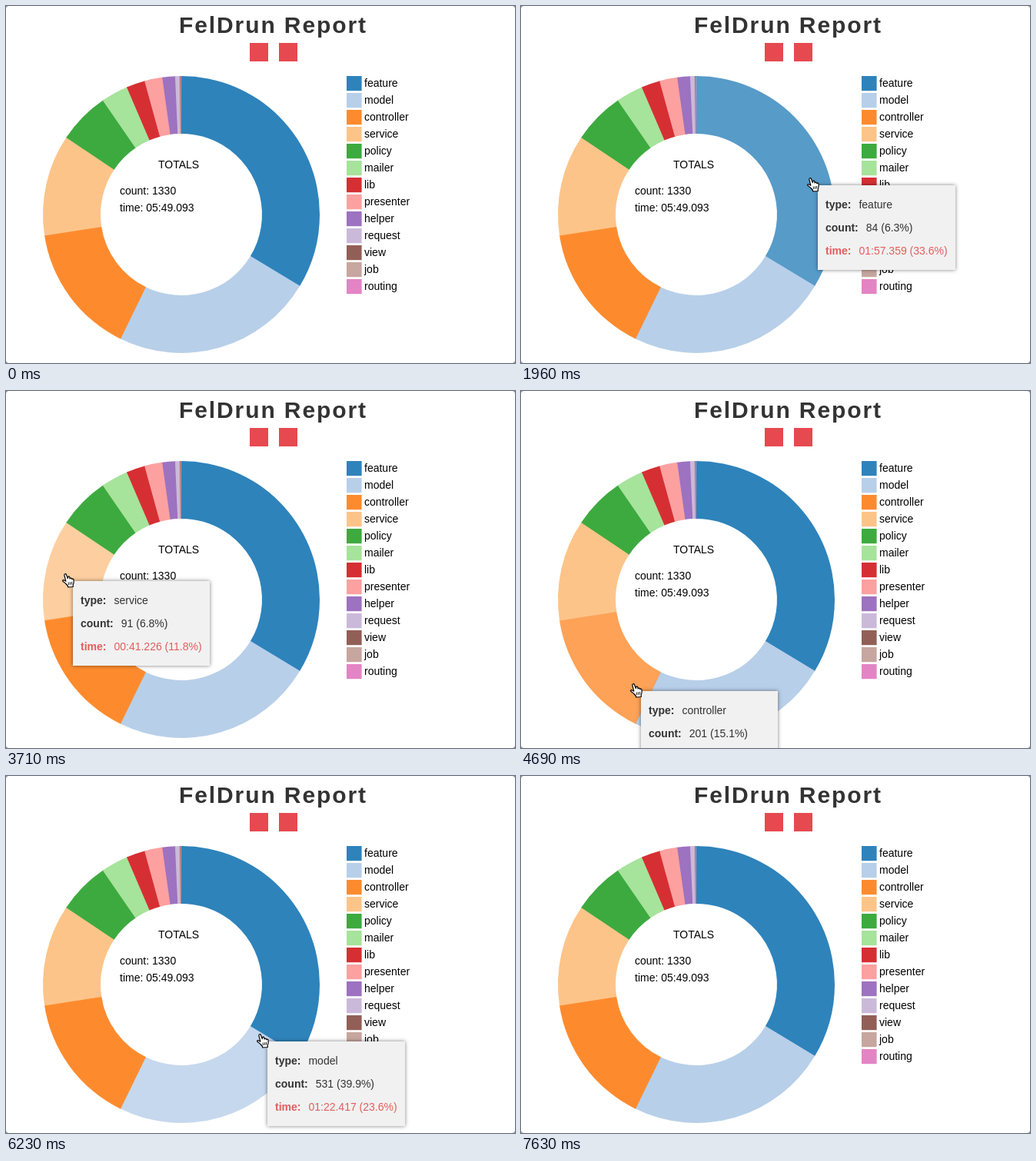
Animation, 662 px wide and 464 px high, one loop 7.7 s. Source, as an HTML page with a canvas:

```html
<!DOCTYPE html>
<html lang="en">
<head>
<meta charset="utf-8">
<title>FelDrun Report</title>
<style>
  html, body { margin: 0; width: 100%; height: 100%; overflow: hidden; background: #fff; }
  canvas { display: block; }
</style>
</head>
<body>
<canvas id="stage" width="662" height="464"></canvas>
<script>
const ctx = document.getElementById('stage').getContext('2d');
const W = 662, H = 464, LOOP = 7700, STEP = 70;
const FACE = '"Liberation Sans", Arial, sans-serif';
const PLAIN = '14px ' + FACE, BOLD = 'bold 14px ' + FACE;
const CX = 228, CY = 271, OUTER = 180, INNER = 105;
const TAU = Math.PI * 2;
const LAP = 0.005; // slices run slightly under the next one, so no seam shows

// name, colour, count, seconds
const TAGS = [
  ['feature', '#2e83bb', 84, 117.359],
  ['model', '#b8cfe9', 531, 82.417],
  ['controller', '#fd8b2e', 201, 53.511],
  ['service', '#fdc489', 91, 41.226],
  ['policy', '#3daa3f', 178, 21.021],
  ['mailer', '#a6e39b', 62, 11.032],
  ['lib', '#d62f33', 97, 7.575],
  ['presenter', '#fda0a0', 34, 7.261],
  ['helper', '#9d72c0', 26, 5.184],
  ['request', '#cbb9da', 8, 1.92],
  ['view', '#925f56', 11, 0.314],
  ['job', '#c7a69f', 5, 0.173],
  ['routing', '#e384c5', 2, 0.1]
].map(([name, color, count, secs]) => ({ name, color, count, secs }));

const sum = key => TAGS.reduce((total, tag) => total + tag[key], 0);
const COUNT = sum('count'), SECS = sum('secs');

let turn = 0;
for (const tag of TAGS) {
  tag.from = turn;
  turn += tag.secs / SECS * TAU;
  tag.to = turn;
}

// pointer path: time, x, y
const PATH = [
  [140, 268, -30], [280, 268, 40], [490, 275, 170], [770, 322, 338],
  [980, 290, 310], [1400, 285, 285], [1680, 305, 270], [1960, 376, 223],
  [2240, 346, 168], [2520, 268, 128], [2800, 218, 144], [3080, 182, 130],
  [3360, 130, 158], [3710, 77, 237], [4130, 88, 308], [4550, 128, 366],
  [5040, 196, 402], [5600, 278, 384], [6160, 325, 340], [6580, 348, 312],
  [6930, 351, 305], [7210, 342, 345], [7560, 318, 480]
];

function slope(i, k) {
  const a = PATH[Math.max(i - 1, 0)], b = PATH[Math.min(i + 1, PATH.length - 1)];
  return (b[k] - a[k]) / (b[0] - a[0]);
}

function pointerAt(t) {
  if (t < PATH[0][0] || t >= PATH[PATH.length - 1][0]) return null;
  const i = PATH.findIndex((p, n) => n < PATH.length - 1 && t < PATH[n + 1][0]);
  const a = PATH[i], b = PATH[i + 1], d = b[0] - a[0], u = (t - a[0]) / d;
  const along = k => {
    const v = 1 - u;
    return Math.round(
      v * v * (1 + 2 * u) * a[k] + u * u * (3 - 2 * u) * b[k] +
      u * v * d * (v * slope(i, k) - u * slope(i + 1, k)));
  };
  return { x: along(1), y: along(2) };
}

function tagUnder({ x, y }) {
  const dx = x - CX, dy = y - CY, r = Math.hypot(dx, dy);
  if (r < INNER || r > OUTER) return null;
  const angle = (Math.atan2(dx, -dy) + TAU) % TAU;
  return TAGS.find(tag => angle < tag.to) || null;
}

function text(str, x, y, font = PLAIN, color = '#000') {
  ctx.font = font;
  ctx.fillStyle = color;
  ctx.fillText(str, x, y);
  return ctx.measureText(str).width;
}

function clock(secs) {
  const min = String(Math.floor(secs / 60)).padStart(2, '0');
  return min + ':' + (secs % 60).toFixed(3).padStart(6, '0');
}

const share = (part, whole) => ` (${+(part / whole * 100).toFixed(1)}%)`;

function drawPage() {
  ctx.fillStyle = '#8c8c8c';
  ctx.fillRect(0, 0, W, H);
  ctx.fillStyle = '#fff';
  ctx.beginPath();
  ctx.roundRect(0, 0, W, H, 4);
  ctx.fill();

  ctx.letterSpacing = '1.9px';
  text('FelDrun Report', 225, 35, 'bold 30px ' + FACE, '#333');
  ctx.letterSpacing = '0px';
  ctx.fillStyle = '#e6494f';
  ctx.fillRect(317, 48, 24, 24);
  ctx.fillRect(355, 48, 24, 24);
}

function drawChart(hot) {
  for (const tag of TAGS) {
    const from = tag.from - TAU / 4;
    const to = Math.min(tag.to + LAP, TAU) - TAU / 4;
    ctx.globalAlpha = tag === hot ? 0.8 : 1;
    ctx.fillStyle = tag.color;
    ctx.beginPath();
    ctx.arc(CX, CY, OUTER, from, to);
    ctx.arc(CX, CY, INNER, to, from, true);
    ctx.fill();
  }
  ctx.globalAlpha = 1;
  text('TOTALS', 198, 211);
  text('count: ' + COUNT, 148, 245);
  text('time: ' + clock(SECS), 148, 267);

  TAGS.forEach((tag, i) => {
    ctx.fillStyle = tag.color;
    ctx.fillRect(443, 91 + 22 * i, 19.6, 19.2);
    text(tag.name, 466, 105 + 22 * i);
  });
}

function drawTip(tag, x, y) {
  const rows = [
    ['type:', tag.name, '#333'],
    ['count:', tag.count + share(tag.count, COUNT), '#333'],
    ['time:', clock(tag.secs) + share(tag.secs, SECS), '#e35d5d']
  ];
  const width = Math.max(...rows.map(([label, value]) => {
    ctx.font = BOLD;
    const w = ctx.measureText(label).width;
    ctx.font = PLAIN;
    return w + ctx.measureText(value).width;
  })) + 30;

  ctx.save();
  ctx.shadowColor = 'rgba(0,0,0,.5)';
  ctx.shadowBlur = 5;
  ctx.fillStyle = '#f1f1f1';
  ctx.fillRect(x, y, Math.round(width), 110);
  ctx.restore();

  rows.forEach(([label, value, color], i) => {
    const base = y + 30 + 30 * i;
    const w = text(label, x + 10, base, BOLD, color);
    text(value, x + 20 + w, base, PLAIN, color);
  });
}

const HAND = new Path2D(
  'M-2.2 1.2C-2.4-.4-.2-.9.5.7L2.3 5.6C3-.1 5.1 4.3 5.1 6C5.7 4.6 7.5 4.9 7.7 6.6' +
  'C8.4 5.6 10 6.1 10.1 7.6C10.4 10 10.6 11.8 9.2 14L9.3 16.5L2.8 17L2.2 15' +
  'C.4 13.2-.8 11.4-3.2 10C-5.4 8.6-4.1 6.8-2.2 8L-.2 9.2Z');
const FINGERS = new Path2D('M3.2 10.5L3.5 14M5.4 10.3L5.6 13.8M7.5 10L7.6 13.5');
const ARROW = new Path2D('M0 0V14L3.2 11L5.3 16L7.6 15L5.5 10.2H10Z');

function drawPointer({ x, y }, hot) {
  ctx.save();
  ctx.translate(x + 1, y + 1);
  ctx.lineJoin = 'round';
  ctx.lineWidth = 1.2;
  ctx.fillStyle = hot ? '#fff' : '#000';
  ctx.strokeStyle = hot ? '#000' : '#fff';
  const shape = hot ? HAND : ARROW;
  ctx.fill(shape);
  ctx.stroke(shape);
  if (hot) {
    ctx.lineWidth = 0.9;
    ctx.stroke(FINGERS);
  }
  ctx.restore();
}

function frame(now) {
  const t = Math.floor((now % LOOP) / STEP) * STEP;
  const pointer = pointerAt(t);
  const hot = pointer && tagUnder(pointer);
  drawPage();
  drawChart(hot);
  if (hot) drawTip(hot, pointer.x + 10, pointer.y + 10);
  if (pointer) drawPointer(pointer, hot);
}

let start;
function tick(now) {
  start ??= now;
  frame(Math.max(0, now - start));
  requestAnimationFrame(tick);
}
frame(0);
requestAnimationFrame(tick);
</script>
</body>
</html>
```
